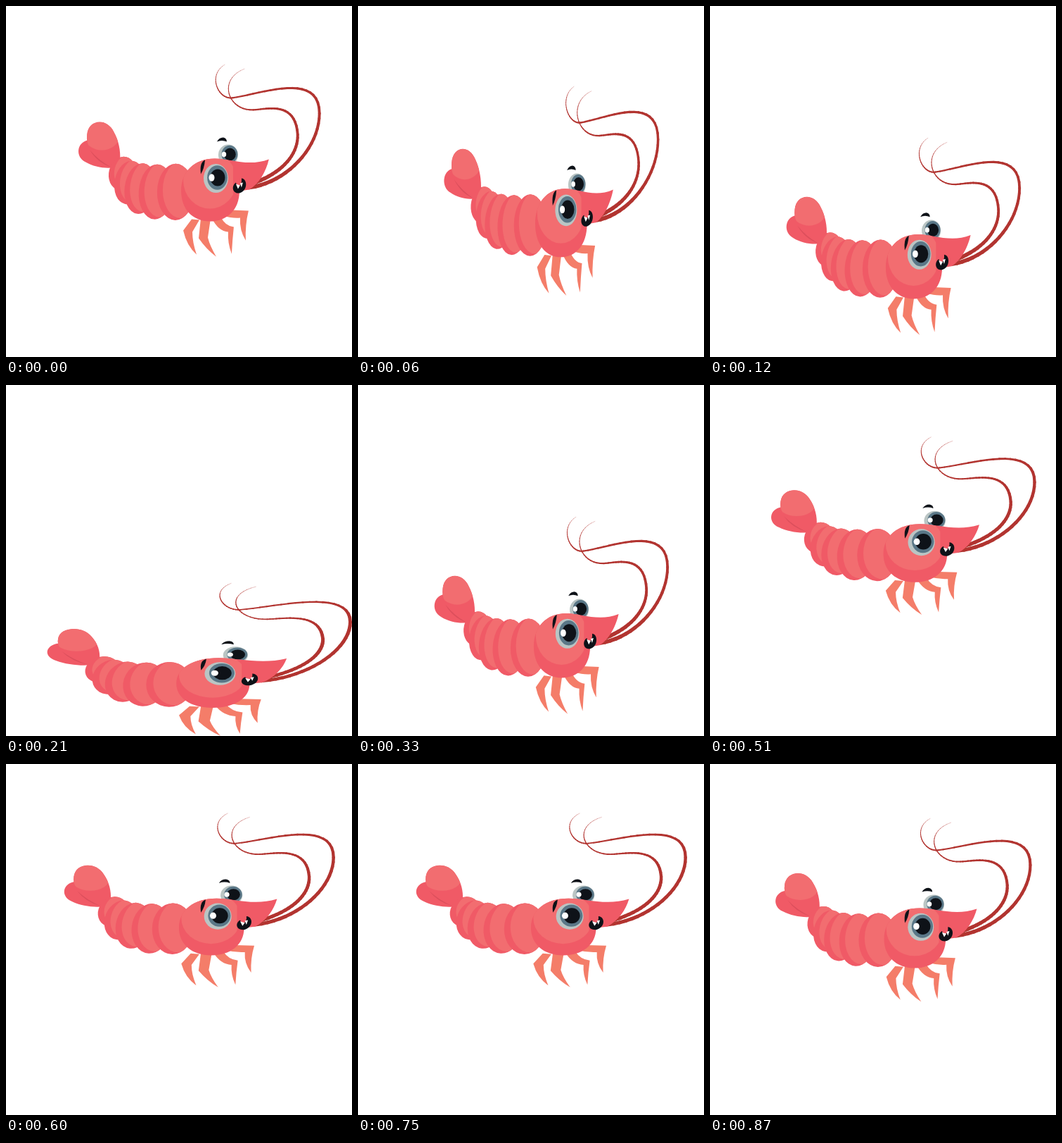
These frames come from a looping animation (492 by 498 pixels, 900 ms). An HTML page with a canvas:

```html
<!DOCTYPE html>
<html>
<head>
<meta charset="utf-8">
<style>
html, body { margin: 0; width: 100%; height: 100%; overflow: hidden; background: #fff; }
canvas { display: block; }
</style>
</head>
<body>
<canvas id="stage" width="492" height="498"></canvas>
<script>
const ctx = document.getElementById('stage').getContext('2d');
const LIGHT = '#f26d70', DARK = '#f05a66', SHADE = '#dc4f5c', LEG = '#f47d69';
const FEELER = '#b23430', RING = '#bac5c4', IRIS = '#5a7787', INK = '#0e1218';

const bell = (x, power = 2) => Math.exp(-(Math.abs(x) ** power));

function shape(d, color) {
  ctx.fillStyle = color;
  ctx.fill(new Path2D(d));
}

function oval(x, y, rx, ry, color, turn = 0) {
  ctx.fillStyle = color;
  ctx.beginPath();
  ctx.ellipse(x, y, rx, ry, turn, 0, 7);
  ctx.fill();
}

// Fills the outline in the dark tone, then draws inside it only
function shaded(outline, drawInside) {
  ctx.save();
  ctx.fillStyle = DARK;
  ctx.fill(outline);
  ctx.clip(outline);
  drawInside();
  ctx.restore();
}

// Three joined cubic curves, thinning towards the tip
function feeler(...p) {
  const steps = 20, total = 3 * steps;
  let last = p[0];
  ctx.strokeStyle = FEELER;
  ctx.lineCap = 'round';
  for (let n = 1; n <= total; n++) {
    const i = Math.floor((n - 1) / steps), u = n / steps - i, v = 1 - u;
    const [a, b, c, d] = p.slice(3 * i, 3 * i + 4);
    const next = [0, 1].map(k =>
      v * v * v * a[k] + 3 * v * v * u * b[k] + 3 * v * u * u * c[k] + u * u * u * d[k]);
    ctx.lineWidth = 0.3 + 5.5 * (1 - n / total);
    ctx.beginPath();
    ctx.moveTo(...last);
    ctx.lineTo(...next);
    ctx.stroke();
    last = next;
  }
}

function tail() {
  shape('M116 190C100 193 98 214 113 221C123 227 138 230 149 229L154 218C136 212 122 202 116 190Z', DARK);
  const lobe = new Path2D('M115 182C117 160 143 158 153 178C160 190 163 205 162 218L148 228C136 216 112 206 115 182Z');
  shaded(lobe, () => oval(136, 184, 25, 20, LIGHT));
  shape('M119 204Q132 219 149 228Q130 222 119 204Z', SHADE);
}

function body() {
  for (let i = 0; i < 5; i++) {
    const x = 165 + 7 * i + 3 * i * i, y = 237 + 15 * i - 2.1 * i * i;
    const rx = 19 + 1.8 * i, ry = 24 + 8 * i - i * i, turn = 0.25 - 0.06 * i;
    const ring = new Path2D();
    ring.ellipse(x, y, rx, ry, turn, 0, 7);
    shaded(ring, () => oval(x + 7, y - 3, rx - 1, ry, LIGHT, turn));
  }
}

function legs() {
  shape('M264 302L252 318Q257 340 271 352Q265 335 265 320L275 303Z', LEG);
  shape('M277 301L274 329Q285 345 299 355Q290 340 287 328L291 301Z', LEG);
  shape('M293 301Q302 319 316 320Q315 336 321 351Q322 331 324 313Q312 312 305 298Z', LEG);
  shape('M321 289L345 290Q340 310 341 332Q332 318 333 300Q322 301 309 297Z', LEG);
}

function head() {
  const outline = new Path2D('M249 262C249 235 267 216 297 216C318 216 345 228 374 217C370 234 360 252 346 260L332 262C332 289 314 305 290 305C265 305 249 287 249 262Z');
  shaded(outline, () => {
    ctx.beginPath();
    ctx.rect(240, 200, 83, 110);
    ctx.clip();
    oval(290, 247, 38, 40, LIGHT);
  });
}

function eye(x, y, r, h) {
  oval(x, y, r, h, RING);
  oval(x + 2, y - 1, r * 0.82, h * 0.84, IRIS);
  oval(x + 2.5, y - 1, r * 0.6, h * 0.59, INK);
  oval(x - 6, y - 1, r * 0.23, h * 0.25, '#fff');
}

function shrimp() {
  feeler([346, 257], [400, 250], [446, 200], [446, 152], [446, 92], [365, 124],
    [322, 130], [302, 133], [286, 98], [311, 83]);
  feeler([342, 254], [390, 240], [416, 212], [415, 182], [412, 134], [372, 146],
    [352, 147], [316, 149], [300, 104], [339, 89]);
  tail();
  body();
  legs();
  eye(316, 211, 14, 15);
  head();
  eye(298.5, 244, 17.5, 20.5);

  shape('M300 192Q303 186 309 186Q314 187 314 192Q307 189 300 192Z', INK);
  shape('M283 218Q275 221 277 238Q282 230 283 218Z', INK);
  shape('M335 244C344 245 344 262 332 265C322 266 320 255 327 250C329 257 336 256 335 244Z', INK);
  shape('M327 252L330 259L333 254ZM333 251L335 257L337 250Z', '#fff');
}

// The jump is symmetric: d counts 30 ms steps away from the landing
function frame(now) {
  const step = Math.floor(now % 900 / 30);
  const fromLanding = Math.abs(step - 7.5), d = Math.min(fromLanding, 30 - fromLanding);
  const sx = d < 5 ? 0.88 + 0.387 * bell(d / 2.85) : 1.116 - 0.236 * bell((d - 5) / 3);
  const sy = 1 - 0.8 * (sx - 1);
  const feet = 316.5 + 181.5 * bell(d / 6.42, 2.75);
  ctx.setTransform(1, 0, 0, 1, 0, 0);
  ctx.clearRect(0, 0, 492, 498);
  ctx.setTransform(sx, 0, 0, sy, 275.5 * (1 - sx), feet - 355 * sy);
  shrimp();
  requestAnimationFrame(frame);
}
frame(performance.now());
</script>
</body>
</html>
```
